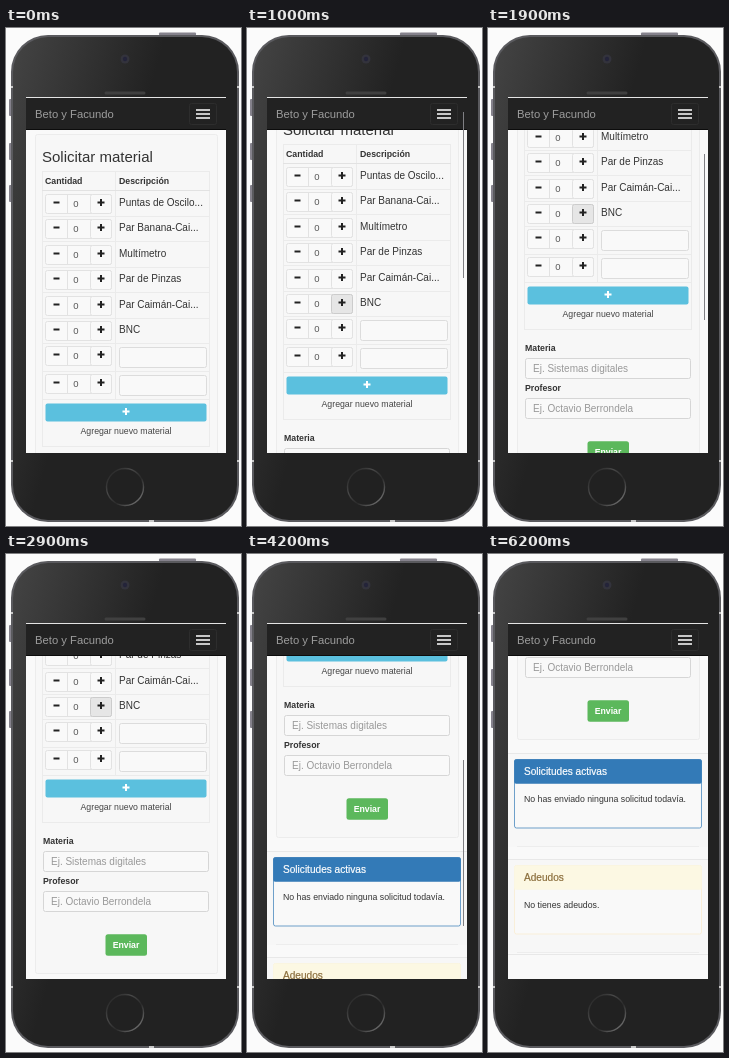
Write an HTML page that moves like this. It is 235 by 498 pixels and loops after 8000 ms.

```html
<!DOCTYPE html>
<html lang="es">
<head>
<meta charset="utf-8">
<style>
html, body { margin: 0; width: 100%; height: 100%; overflow: hidden; background: #fbfbfb; }
svg { display: block; width: 235px; height: 498px; font-family: "Liberation Sans", Arial, sans-serif; }
</style>
</head>
<body>
<svg id="stage" viewBox="0 0 235 498">
  <defs>
    <clipPath id="view"><rect x="20" y="102" width="200" height="323"/></clipPath>
    <linearGradient id="ring" x1="0" y1="0" x2="1" y2="1">
      <stop offset="0" stop-color="#1a1a1a"/>
      <stop offset=".35" stop-color="#484848"/>
      <stop offset=".6" stop-color="#2a2a2a"/>
      <stop offset="1" stop-color="#888"/>
    </linearGradient>
    <linearGradient id="sheen" x1="0" y1="0" x2=".5" y2=".3">
      <stop offset="0" stop-color="#444"/>
      <stop offset="1" stop-color="#222"/>
    </linearGradient>
  </defs>
  <g id="phone"></g>
  <g clip-path="url(#view)"><g id="page"></g></g>
  <g id="nav"></g>
  <rect id="bar" x="216" width="1" height="166" fill="#808084"/>
</svg>
<script>
const LOOP = 8000, STEP = 100;
const $ = id => document.getElementById(id);

function add(parent, tag, attrs, text) {
  const el = document.createElementNS("http://www.w3.org/2000/svg", tag);
  for (const key in attrs) el.setAttribute(key, attrs[key]);
  if (text) el.textContent = text;
  parent.appendChild(el);
  return el;
}
const rect = (p, x, y, width, height, fill, extra) =>
  add(p, "rect", { x, y, width, height, fill, ...extra });
const box = (p, x, y, w, h, fill, stroke, rx = 2) =>
  rect(p, x + .5, y + .5, w - 1, h - 1, fill, { stroke, rx });
const label = (p, x, y, text, size, fill, extra) =>
  add(p, "text", { x, y, "font-size": size, fill, ...extra }, text);
const path = (p, d, stroke, width = 1) =>
  add(p, "path", { d, stroke, "stroke-width": width, fill: "none" });
const plus = (p, x, y, r, color) =>
  path(p, `M${x - r} ${y}h${2 * r}M${x} ${y - r}v${2 * r}`, color, 2);
const BOLD = { "font-weight": "bold" };
const MIDDLE = { "text-anchor": "middle" };
const PAPER = "#f9f9f9", WELL = "#f7f7f7";

function drawPhone(g) {
  const metal = "#85828c";
  for (const y of [71, 115, 157]) rect(g, 3, y, 4, 17, metal, { rx: 1 });
  rect(g, 153, 4.5, 37, 5, metal, { rx: 1 });
  rect(g, 5, 7, 228, 487, "#5a5a5e", { rx: 37 });
  path(g, "M5 59h2.5M230.5 59h2.5M5 433h2.5M230.5 433h2.5M143 493h5", "#c8c8c8", 2);
  rect(g, 7, 9, 224, 483, "url(#sheen)", { rx: 35 });
  add(g, "circle", { cx: 119, cy: 31, r: 4.5, fill: "#33333c" });
  add(g, "circle", { cx: 119, cy: 31, r: 2.2, fill: "#24243a" });
  rect(g, 98.5, 63.5, 41, 3, "#404040", { rx: 1.5 });
  add(g, "circle", { cx: 119, cy: 459, r: 18.5, fill: "#212121", stroke: "url(#ring)", "stroke-width": 1.4 });
  rect(g, 20, 69, 200, 356, PAPER);
}

function drawNav(g) {
  rect(g, 20, 69, 200, 33, "#222");
  rect(g, 20, 69, 200, 1, "#e4e4e4");
  rect(g, 20, 101, 200, 1, "#0c0c0c");
  label(g, 29, 90, "Beto y Facundo", 11.25, "#9d9d9d");
  box(g, 183, 75, 28, 22, "none", "#2d2d2d");
  path(g, "M190 82h14M190 86h14M190 90h14", "#fff", 1.4);
}

// Draws a "- 0 +" group and returns its plus button.
function stepper(g, y) {
  box(g, 39, y, 67, 20, PAPER, "#e2e2e2");
  const button = box(g, 84, y, 22, 20, PAPER, "#e2e2e2");
  path(g, `M61.5 ${y}v20`, "#e2e2e2");
  path(g, `M47.5 ${y + 8.5}h6`, "#222", 2);
  label(g, 70, y + 13, "0", 9.5, "#555", MIDDLE);
  plus(g, 95, y + 8.5, 3.5, "#222");
  return button;
}

function drawTable(g) {
  box(g, 36, 143, 168, 276, WELL, "#ebebeb", 0);
  label(g, 39, 156, "Cantidad", 8.75, "#333", BOLD);
  label(g, 113, 156, "Descripción", 8.75, "#333", BOLD);
  path(g, "M109.5 143V371", "#ebebeb");
  path(g, "M36 162.5H204", "#e2e2e2");
  const items = ["Puntas de Oscilo...", "Par Banana-Cai...", "Multímetro", "Par de Pinzas", "Par Caimán-Cai...", "BNC"];
  let pressable;
  items.forEach((name, i) => {
    const top = 166 + Math.round(25.4 * i);
    path(g, `M36 ${top + 22.5}H204`, "#ebebeb");
    pressable = stepper(g, top);
    label(g, 113, top + 11.5, name, 10, "#333");
  });
  for (const top of [319, 347]) {
    stepper(g, top - 1);
    box(g, 113, top, 88, 21, PAPER, "#dcdcdc");
    path(g, `M36 ${top + 24.5}H204`, "#ebebeb");
  }
  rect(g, 39.5, 375.5, 161, 18, "#5bc0de", { rx: 2 });
  plus(g, 120, 383.5, 3.5, "#fff");
  label(g, 120, 406, "Agregar nuevo material", 8.75, "#444", MIDDLE);
  return pressable;
}

function field(g, y, name, hint) {
  label(g, 37, y, name, 8.75, "#333", BOLD);
  box(g, 37, y + 7, 166, 21, PAPER, "#d6d6d6");
  label(g, 45, y + 21.3, hint, 10, "#999");
}

function panel(g, y, title, body, header, border, color) {
  rect(g, 20, y - 6, 200, 94, WELL);
  path(g, `M20 ${y - 5.5}H220`, "#e8e8e8");
  path(g, `M29 ${y + 87.5}H211`, "#ededed");
  box(g, 26, y, 188, 69.5, PAPER, border).setAttribute("stroke-width", .7);
  rect(g, 26.2, y + .2, 187.6, 24.6, header, { rx: 2 });
  label(g, 36, y + 16.4, title, 10.1, color, { stroke: color, "stroke-width": .2 });
  label(g, 36, y + 43, body, 8.75, "#333");
}

function drawPage(g) {
  box(g, 29, 106, 183, 464, WELL, "#ececec");
  label(g, 36, 134, "Solicitar material", 15, "#333");
  const pressable = drawTable(g);
  field(g, 440, "Materia", "Ej. Sistemas digitales");
  field(g, 480, "Profesor", "Ej. Octavio Berrondela");
  rect(g, 99.5, 530.3, 41.5, 21.4, "#5cb85c", { rx: 2.5 });
  label(g, 120, 544, "Enviar", 8.75, "#fff", { ...BOLD, ...MIDDLE });
  panel(g, 589, "Solicitudes activas", "No has enviado ninguna solicitud todavía.", "#337ab7", "#337ab7", "#fff");
  panel(g, 695, "Adeudos", "No tienes adeudos.", "#fcf8e3", "#faebcc", "#8a6d3b");
  path(g, "M20 784.5H220", "#e8e8e8");
  return pressable;
}

// [time, value] keys, linear in between
const SCROLL = [
  [400, 0], [500, 1], [700, 8], [1000, 27], [1300, 54], [1900, 117], [2100, 138],
  [2200, 145], [2300, 148.5], [2400, 150], [3500, 150], [3600, 170], [3800, 236],
  [3900, 256], [4000, 270], [4100, 280], [4200, 286], [4300, 290], [5200, 290],
  [5300, 294], [5400, 335], [5500, 370], [5600, 384], [8000, 384]
];
const BAR = [
  [400, 0], [500, 1], [2700, 1], [2900, 0], [3500, 0], [3600, 1], [4600, 1],
  [4800, 0], [5200, 0], [5300, 1], [5900, 1], [6200, 0], [8000, 0]
];

function sample(keys, t) {
  const i = keys.findIndex(key => key[0] >= t);
  if (i <= 0) return keys[0][1];
  const [t0, v0] = keys[i - 1], [t1, v1] = keys[i];
  return v0 + (v1 - v0) * (t - t0) / (t1 - t0);
}

drawPhone($("phone"));
drawNav($("nav"));
const pressed = drawPage($("page"));

function render(time) {
  const t = Math.floor((time % LOOP) / STEP) * STEP;
  const scroll = Math.round(sample(SCROLL, t));
  const held = t >= 500;
  $("page").setAttribute("transform", `translate(0 ${-scroll})`);
  $("bar").setAttribute("y", Math.round(71.5 + scroll * .47));
  $("bar").setAttribute("opacity", sample(BAR, t));
  pressed.setAttribute("fill", held ? "#e6e6e6" : PAPER);
  pressed.setAttribute("stroke", held ? "#ccc" : "#e2e2e2");
}

const start = performance.now();
function tick() {
  render(performance.now() - start);
  requestAnimationFrame(tick);
}
tick();
</script>
</body>
</html>
```
